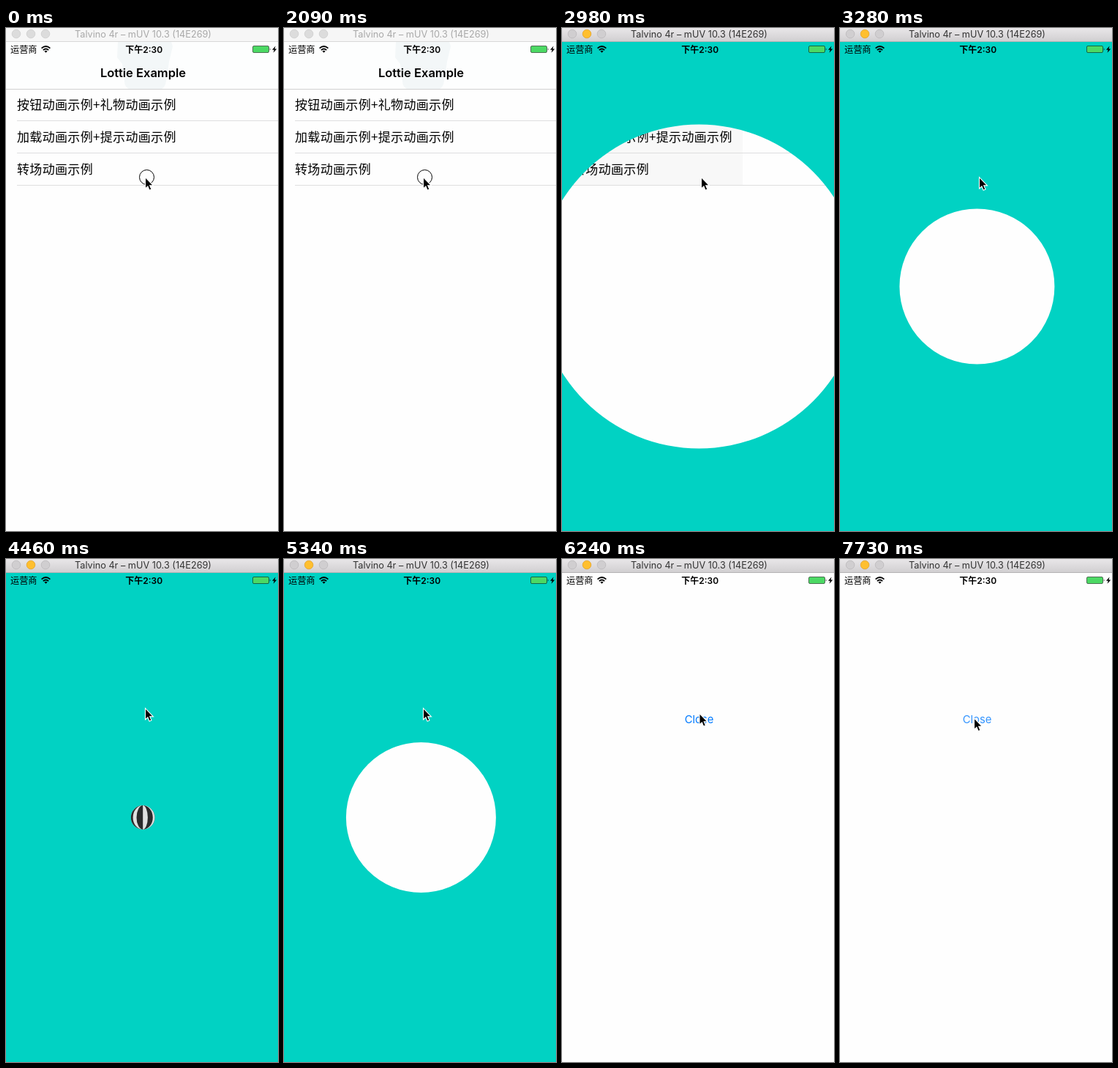
Write an HTML page that moves like this. It is 372 px wide and 686 px high and loops after 8000 ms.

```html
<!DOCTYPE html>
<html lang="zh-CN">
<head>
<meta charset="utf-8">
<style>
  html, body { margin: 0; width: 100%; height: 100%; overflow: hidden; background: #fefefe; }
  svg { display: block; width: 372px; height: 686px; }
  text { font-family: Inter, "Noto Sans CJK SC", "Noto Sans CJK", sans-serif; }
  .cjk { font-family: "Noto Sans CJK SC", "Noto Sans CJK", sans-serif; }
  .rows { font-size: 17px; letter-spacing: .33px; }
  .mid { text-anchor: middle; }
</style>
</head>
<body>
<svg viewBox="0 0 372 686">
  <defs>
    <linearGradient id="chrome" x2="0" y2="1">
      <stop stop-color="#e9e7e9"/><stop offset="1" stop-color="#d1cfd1"/>
    </linearGradient>
  </defs>
  <rect width="372" height="686" fill="#fefefe"/>

  <g id="list">
    <rect y="19" width="372" height="64" fill="#fdfefe"/>
    <path d="M153 19H226L228 25 223 46 219 72Q218 80 213 83H168Q162 80 162 72L159 49 152 40Z" fill="#f3f7f8"/>
    <rect id="dim" x="15" y="84" width="232" height="130" fill="#f8f8f8"/>
    <path d="M0 83.5H372" stroke="#d0d0d0"/>
    <path d="M15 126.5H372M15 170.5H372M15 214.5H372" stroke="#dededf"/>
    <text class="mid" x="187.5" y="67" font-size="16.5" font-weight="600">Lottie Example</text>
    <g class="rows">
      <text class="cjk" x="15" y="111">按钮动画示例+礼物动画示例</text>
      <text class="cjk" x="15" y="155">加载动画示例+提示动画示例</text>
      <text class="cjk" x="15" y="199">转场动画示例</text>
    </g>
  </g>

  <text id="close" class="mid" x="187.5" y="224" font-size="14.8" fill="#007aff">Close</text>
  <path id="cover" fill="#01d2c3" fill-rule="evenodd"/>
  <g id="ball" transform="translate(187.2 352.5)">
    <circle id="ballBase" fill="#e0e0e0"/>
    <path id="stripes" fill="#292a2b"/>
  </g>

  <g id="status">
    <text class="cjk" x="6" y="34" font-size="12.2">运营商</text>
    <g fill="none" stroke="#000" stroke-width="1.7">
      <path d="M48.6 27.7Q54.5 22.3 60.4 27.7M50.8 30.2Q54.5 26.8 58.2 30.2"/>
    </g>
    <path d="M52.4 31.6Q54.5 29.9 56.6 31.6L54.5 33.8Z"/>
    <text class="mid" x="188.7" y="33.5" font-size="12" font-weight="600"><tspan class="cjk">下午</tspan>2:30</text>
    <rect x="337.5" y="24.5" width="22" height="9" rx="1.5" fill="#4cd964" stroke="#000" stroke-opacity=".65" stroke-width=".8"/>
    <path d="M360.8 27.2Q362.4 29 360.8 30.8Z"/>
    <path d="M368.6 24.5L364 29.8H366.7L365.6 33.8 370.3 28.4H367.5Z"/>
  </g>

  <rect id="bar" width="372" height="18"/>
  <path id="barLine" d="M0 18.5H372"/>
  <g stroke-width=".8">
    <circle class="light" cx="14" cy="8" r="5.8"/>
    <circle class="light" cx="34" cy="8" r="5.8"/>
    <circle class="light" cx="54" cy="8" r="5.8"/>
  </g>
  <text id="title" class="mid" x="187.5" y="13" font-size="12.7">Talvino 4r – mUV 10.3 (14E269)</text>

  <circle id="ring" r="10" fill="none" stroke="#000"/>
  <path id="cursor" d="M0 -.5V15L3.4 12 5.6 17.2 8.4 16 6.2 10.9H10.9Z" stroke="#fff" stroke-width="1.1"/>
</svg>
<script>
const LOOP = 8000, STEP = 148.7;
const $ = id => document.getElementById(id);
const set = (el, attrs) => { for (const k in attrs) el.setAttribute(k, attrs[k]); };
const show = (id, on) => { $(id).style.display = on ? '' : 'none'; };

// Key points are [step, value...]; values in between are linear.
const RADIUS = [[20, 221], [21, 138], [22, 106], [24, 82], [27, 62], [28, 42],
  [30, 16.4], [33, 20], [35, 58], [36, 102.5], [37, 284], [38, 450]];
const CURSOR = [[41, 190.5, 204], [42, 188, 211], [43, 182, 219], [44, 179, 222], [45, 181, 219], [46, 183.5, 217.5]];

function at(keys, n) {
  const next = keys.findIndex(k => k[0] >= n);
  if (next === 0) return keys[0].slice(1);
  if (next < 0) return keys[keys.length - 1].slice(1);
  const a = keys[next - 1], b = keys[next], p = (n - a[0]) / (b[0] - a[0]);
  return a.slice(1).map((v, i) => v + (b[i + 1] - v) * p);
}

// Dark bands between meridians of a turning sphere.
function sphereBands(r, turn) {
  const sine = deg => Math.sin(Math.max(-90, Math.min(90, deg)) * Math.PI / 180);
  let d = '';
  for (let deg = (turn + 24) % 56 - 168; deg < 90; deg += 56) {
    if (deg + 32 <= -90) continue;
    const left = sine(deg), right = sine(deg + 32);
    d += `M0 ${-r}A${Math.abs(right) * r} ${r} 0 0 ${right > 0 ? 1 : 0} 0 ${r}` +
         `A${Math.abs(left) * r} ${r} 0 0 ${left > 0 ? 0 : 1} 0 ${-r}Z`;
  }
  return d;
}

function drawWindow(active) {
  set($('bar'), { fill: active ? 'url(#chrome)' : '#f6f6f6' });
  set($('barLine'), { stroke: active ? '#b5b3b5' : '#d8d8d8' });
  set($('title'), { fill: active ? '#333' : '#a9a9a9' });
  document.querySelectorAll('.light').forEach((light, i) => {
    const yellow = active && i === 1;
    set(light, {
      fill: yellow ? '#ffbf2f' : active ? '#d0ced0' : '#dcdcdc',
      stroke: yellow ? '#e2a32a' : active ? '#bbb9bb' : '#cfcfcf'
    });
  });
}

function drawTransition(n) {
  const [r] = at(RADIUS, n);
  const ball = n >= 28 && n < 36;
  show('list', n < 28);
  show('dim', n >= 18);
  show('close', n >= 36);
  show('cover', n >= 20 && n < 38);
  show('ball', ball);
  const hole = `M${187.4 - r} 352.5a${r} ${r} 0 1 0 ${2 * r} 0a${r} ${r} 0 1 0 ${-2 * r} 0Z`;
  set($('cover'), { d: 'M0 19H372V686H0Z' + (ball ? '' : hole) });
  if (ball) {
    set($('ballBase'), { r });
    set($('stripes'), { d: sphereBands(r, (n - 30) * 20 + 112) });
  }
}

function drawPointer(n) {
  const [x, y] = at(CURSOR, n);
  set($('cursor'), { transform: `translate(${x} ${y})` });
  set($('ring'), { cx: x + 2, cy: y - .5 });
  show('ring', n === 0 || n === 14 || n === 51);
  set($('close'), { opacity: n < 51 ? 1 : n === 51 ? .3 : .8 });
}

function render() {
  const n = Math.floor((performance.now() % LOOP + 14) / STEP);
  drawWindow(n >= 15);
  drawTransition(n);
  drawPointer(n);
  requestAnimationFrame(render);
}
render();
</script>
</body>
</html>
```
